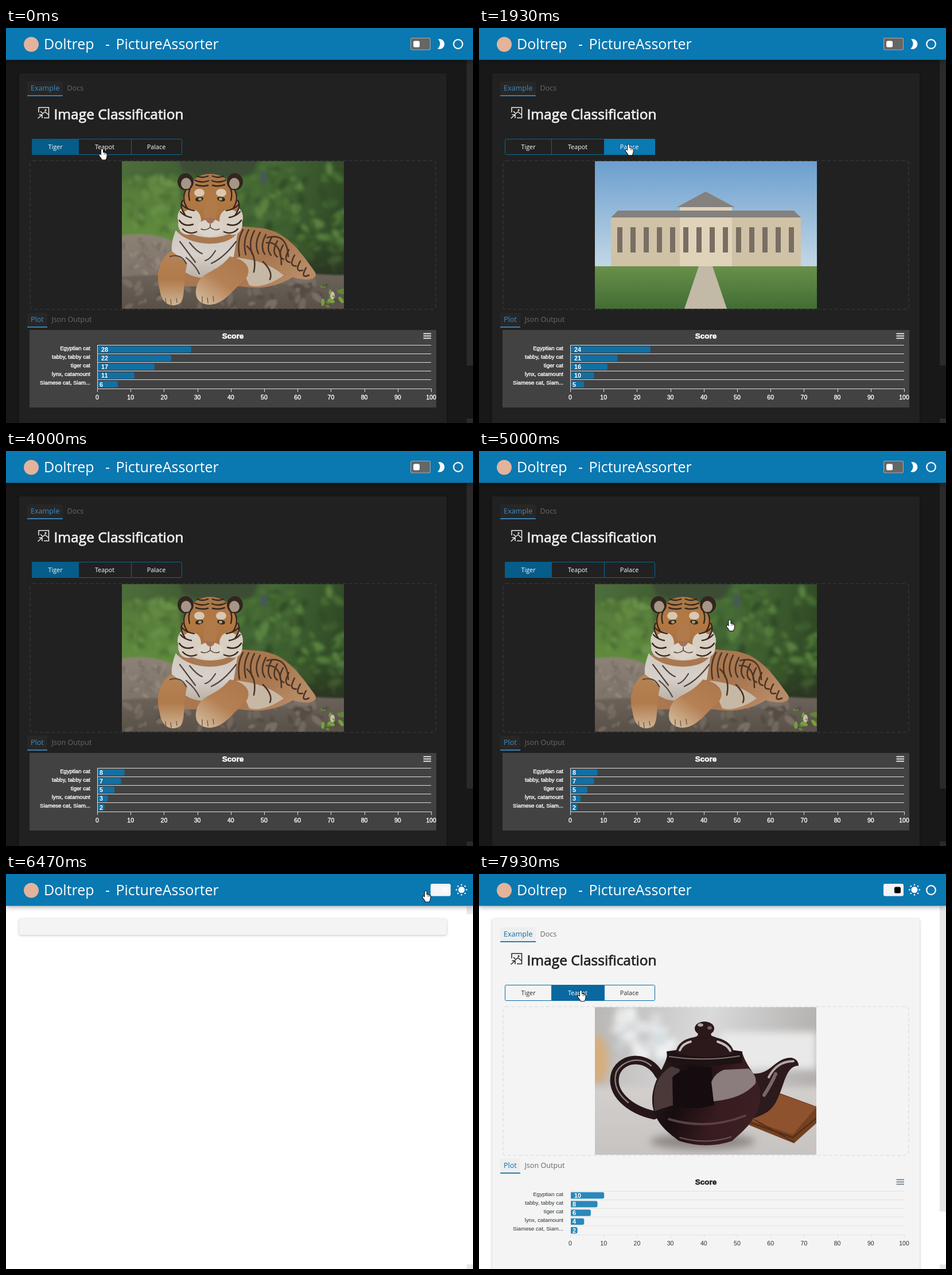
Animation, 814 px wide and 688 px high, one loop 8 s. Source, as an HTML page with a canvas:

```html
<!DOCTYPE html>
<html lang="en">
<head>
<meta charset="utf-8">
<title>Image Classification</title>
<style>
html, body { margin: 0; width: 100%; height: 100%; overflow: hidden; background: #181818; }
canvas { display: block; width: 814px; height: 688px; }
</style>
</head>
<body>
<canvas id="stage" width="814" height="688"></canvas>
<script>
const LOOP = 8000;
const SANS = '"Open Sans", sans-serif';
const ARIAL = '"Liberation Sans", Arial, sans-serif';
const stage = document.getElementById('stage').getContext('2d');
let g = stage;

const DARK = {
  bg: '#181818', card: '#212121', thumb: '#2a2a2a', tabBg: '#272727', accent: '#3c8cc4', muted: '#686868',
  head: '#eeeeee', btnText: '#ffffff', btnLine: '#0b6797', active: '#065d8a', hover: '#0b79b2',
  dash: '#343434', chart: '#424242', grid: '#dedede', label: '#ffffff', weight: 0.35, title: '#ffffff',
  bar: '#126fa3', menu: '#f0f0f0'
};
const LIGHT = {
  bg: '#ffffff', card: '#f4f4f4', thumb: '#e8e8e8', tabBg: '#eeeeee', accent: '#0a6fa6', muted: '#666666',
  head: '#242424', btnText: '#2b2b2b', btnLine: '#0a6ea5', active: '#0a78b1', hover: '#0a68a0',
  dash: '#e2e2e2', chart: '#f4f4f4', grid: '#e2e2e2', label: '#373d3f', weight: 0.05, title: '#222222',
  bar: '#2b88ba', menu: '#6e8192'
};

// Drawing helpers
function rect(color, x, y, w, h, r = 0) {
  g.fillStyle = color;
  g.beginPath();
  g.roundRect(x, y, w, h, r);
  g.fill();
}
function shape(color, d) {
  g.fillStyle = color;
  g.fill(new Path2D(d));
}
function line(color, width, d) {
  g.strokeStyle = color;
  g.lineWidth = width;
  g.stroke(new Path2D(d));
}
function oval(color, x, y, rx, ry = rx, rot = 0) {
  g.fillStyle = color;
  g.beginPath();
  g.ellipse(x, y, rx, ry, rot, 0, Math.PI * 2);
  g.fill();
}
function text(str, x, y, font, color, align = 'left', weight = 0) {
  g.font = font;
  g.fillStyle = color;
  g.textAlign = align;
  g.fillText(str, x, y);
  if (!weight) return;
  g.strokeStyle = color;
  g.lineWidth = weight;
  g.strokeText(str, x, y);
}
function fade(x0, y0, x1, y1, ...colors) {
  const grad = g.createLinearGradient(x0, y0, x1, y1);
  colors.forEach((c, i) => grad.addColorStop(i / (colors.length - 1), c));
  return grad;
}
function seeded(seed) {
  return () => (seed = (seed * 16807) % 2147483647) / 2147483647;
}
function scatter(seed, n, colors, x, y, w, h, size) {
  const rnd = seeded(seed);
  for (let i = 0; i < n; i++) {
    const c = colors[Math.floor(rnd() * colors.length)];
    const px = x + rnd() * w, py = y + rnd() * h, s = size * (0.5 + rnd());
    oval(c, px, py, s, s * 0.5, rnd() * 3);
  }
}
function soften(px) {
  g.filter = px ? `blur(${px}px)` : 'none';
}

// Pictures, painted once in stage coordinates
function photo(x, w, paint) {
  const cv = document.createElement('canvas');
  cv.width = w;
  cv.height = 257;
  const keep = g;
  g = cv.getContext('2d');
  g.translate(-x, -232);
  g.lineCap = 'round';
  paint();
  g = keep;
  return { cv, x };
}

function paintTigerHead() {
  oval('#d5cbc0', 356, 330, 57, 35);
  oval(fade(0, 254, 0, 345, '#a87749', '#b37943', '#a87042'), 356, 306, 49, 52);
  oval('#d8cec2', 320, 338, 19, 23, 0.5);
  oval('#d8cec2', 392, 338, 19, 23, -0.5);
  oval('#dcd3c9', 356, 348, 23, 15);
  oval('#b07a4a', 356, 318, 12, 20);
  [-1, 1].forEach(s => {
    g.save();
    g.translate(356, 0);
    g.scale(s, 1);
    oval('#31261f', 43, 268, 14, 15);
    oval('#a79586', 42, 271, 9, 10);
    oval('#dac7b1', 19, 287, 9, 7);
    line('#34271f', 2.4, 'M4 258Q14 262 23 258M3 266Q15 271 27 265M4 274Q14 277 25 273M33 275Q40 286 36 300M42 281Q51 297 40 314M48 300Q54 311 44 325M28 318Q42 316 49 308M33 330Q45 328 52 320M30 342Q46 347 54 335M24 355Q38 361 48 350');
    oval('#33281f', 19, 298, 7, 4, 0.2);
    oval('#a5a27c', 18, 298, 3, 2.4);
    g.restore();
  });
  shape('#a3705a', 'M347 331H365Q363 339 356 341Q349 339 347 331Z');
  line('#584439', 1.6, 'M356 342V347Q348 354 340 350M356 347Q364 354 372 350');
}

function paintTiger() {
  rect(fade(202, 232, 589, 300, '#4d6e3b', '#3f5c32', '#456936', '#304a26'), 202, 232, 387, 257);
  soften(3);
  shape(fade(0, 260, 0, 360, '#54783b', '#608c3d'), 'M195 262H305V380H195Z');
  scatter(7, 45, ['#638b43', '#4d7235', '#6b924a'], 202, 260, 100, 95, 9);
  scatter(23, 150, ['#3c5d2d', '#4f7838', '#5a8341', '#314c27', '#476c33'], 395, 240, 194, 180, 10);
  shape('#3c4c35', 'M300 225H445L425 258Q380 266 310 252Z');
  shape('#46565c', 'M446 244L456 256 452 275 443 264Z');
  rect(fade(0, 360, 0, 430, 'rgba(35,48,28,0)', 'rgba(43,49,34,.8)'), 500, 350, 95, 90);
  soften(1.5);
  shape(fade(0, 360, 0, 440, '#8c8175', '#7c7268'), 'M198 362C235 355 275 360 300 376V489H198Z');
  scatter(5, 28, ['#91867a', '#7b7168'], 204, 370, 90, 60, 6);
  shape(fade(0, 430, 0, 489, '#6b6259', '#595148'), 'M198 434C285 422 400 445 470 432C520 422 550 432 594 430V495H198Z');
  scatter(31, 60, ['#70675d', '#554d45', '#786e64'], 204, 441, 380, 45, 8);
  oval('#736a64', 482, 437, 18, 9);
  oval('#7c7169', 517, 437, 17, 8);

  soften(0.7);
  shape(fade(410, 350, 500, 440, '#a97850', '#a8764f', '#b78b65'), 'M300 368C290 330 390 344 440 348C487 352 510 385 538 424C548 440 518 441 500 434C470 452 440 455 410 450H300Z');
  shape('#c7b8a5', 'M402 400C438 404 462 412 484 431C466 444 440 454 424 448Z');
  for (let i = 0; i < 12; i++) {
    const x = 413 + i * 10, y = 351 + i * i * 0.55;
    line('#4a3527', 2.6, `M${x} ${y}Q${x - 11} ${y + 20} ${x - 6 + i} ${y + 46 - i * 3}`);
  }
  line('#4a3527', 2.6, 'M455 365Q490 356 492 398M454 374Q480 371 480 412M420 380Q438 396 432 425M448 407Q466 425 460 438');
  shape(fade(0, 350, 0, 440, '#cfc7be', '#d6d1cb', '#b7aca1'), 'M296 352C320 383 390 383 404 355L397 398C372 444 330 442 305 420C283 400 287 375 296 352Z');
  shape(fade(0, 390, 0, 486, '#b58356', '#b07a4a', '#d1b899'), 'M288 388C268 402 260 426 268 456C271 482 291 489 305 478C313 466 308 439 316 410Z');
  shape(fade(400, 400, 345, 480, '#ad784b', '#b58154', '#d1b899'), 'M390 398C421 403 430 422 417 438C397 453 383 480 356 482C331 482 326 462 335 443C344 424 370 424 390 398Z');
  line('#6b5a4a', 1.4, 'M278 471L279 480M287 473L288 482M297 471L298 478M342 468V478M351 470L352 479M361 467L362 476');
  line('#51423a', 2.2, 'M303 372Q318 392 330 408M401 372Q380 400 358 410M314 400Q330 413 337 428M286 398Q305 392 314 410M365 388Q355 404 347 405M320 374Q333 390 342 393');
  paintTigerHead();
  oval('#c7bfaa', 569, 466, 4, 7);
  scatter(3, 12, ['#759f3d', '#628635'], 550, 450, 38, 36, 5);
  soften(0);
}

function paintTeapot() {
  rect(fade(202, 232, 589, 310, '#b9b7b5', '#d9dadb', '#b3b0ae'), 202, 232, 387, 257);
  soften(7);
  oval('#d6ad7e', 205, 324, 21, 43);
  scatter(19, 28, ['#edf1f3', '#d4dde1', '#f5f6f6'], 245, 240, 85, 75, 12);
  rect('#e9e9e9', 420, 275, 169, 65);
  rect(fade(0, 360, 0, 489, '#d4d0cd', '#c6c3c1'), 190, 370, 410, 135);
  oval('#8f8886', 390, 466, 91, 14);
  soften(0);
  shape('#74401f', 'M503 374L588 405V434L549 469 470 437Z');
  shape('#8e522e', 'M505 377L588 406 547 454 476 430Z');
  line('#4f2b19', 2, 'M473 433L547 459 587 426M480 428L548 466');
  line('#251719', 15, 'M314 350C297 316 250 316 238 347C227 382 264 411 305 420');
  line('#8c7c7b', 2.5, 'M300 334C280 316 249 325 239 346C233 369 244 385 260 398');
  shape('#2c1a1d', 'M466 345C508 358 512 319 545 320Q557 323 557 334C535 334 533 365 521 390C511 415 494 420 474 427Z');
  line('#b5a8a7', 4, 'M505 354Q519 326 548 326');
  line('#776668', 6, 'M497 385Q510 365 517 348');
  const body = fade(300, 330, 493, 410, '#2c1d1e', '#160d0f', '#371b1f', '#3c2023');
  shape(body, 'M329 312H459C468 341 493 356 490 393C485 431 455 452 441 465Q397 480 349 465C329 450 300 430 302 389C305 354 324 339 329 312Z');
  shape('#4b393a', 'M309 365Q318 345 335 335L350 340Q342 376 343 401L306 413Q302 387 309 365Z');
  shape('#140c0e', 'M337 354Q355 335 405 337L410 402Q373 414 338 402Z');
  shape('#8b7c7d', 'M405 362Q412 346 427 341L470 339Q485 351 482 365Q460 391 409 396Z');
  line('#584146', 4, 'M331 427Q398 447 464 421');
  line('#675759', 2, 'M350 459Q397 472 439 458');
  shape('#1d1214', 'M327 309Q394 299 459 309L458 329Q395 338 329 328Z');
  shape('#2c191c', 'M343 311Q346 289 376 284Q395 276 414 285Q441 291 445 313Q394 326 343 311Z');
  line('#c9bfbd', 4, 'M416 292Q434 298 438 308M350 307Q355 295 369 292');
  line('#806f6d', 2, 'M332 318Q394 327 454 317');
  shape('#291719', 'M383 275H403L407 287Q394 294 379 287Z');
  oval('#2a181b', 393, 269, 17, 12);
  oval('#b0a4a2', 386, 263, 5, 3);
  oval('#746060', 402, 268, 4, 3);
}

function paintPalace() {
  rect(fade(0, 232, 0, 430, '#6c9fce', '#c9dce8'), 202, 232, 387, 257);
  rect('#d0c2a7', 230, 330, 331, 85);
  rect('#dfd3ba', 350, 312, 91, 103);
  shape('#84817e', 'M230 330L242 318H549L561 330ZM345 312L395 285 446 312Z');
  for (let i = 0; i < 14; i++) rect('#786e62', 241 + i * 23, 347, 9, 44);
  rect(fade(0, 415, 0, 489, '#68904a', '#426d34'), 202, 415, 387, 74);
  shape('#c3b9a7', 'M383 415H407L432 489H358Z');
}

function paintDog() {
  rect(fade(299, 232, 492, 489, '#94b6de', '#9bb8de', '#86a7cf'), 299, 232, 193, 257);
  soften(2);
  scatter(11, 45, ['#86a6cd', '#a1bde1', '#8eafd5'], 302, 350, 120, 130, 7);
  scatter(43, 45, ['#7a9fc3', '#8badd1', '#7298bd'], 390, 410, 75, 75, 8);
  soften(0);
  line('#665c5b', 7, 'M343 337Q333 326 326 307');
  shape('#756a66', 'M337 333Q357 326 379 343L411 361Q418 388 397 401L370 398 354 378 341 382Q329 355 337 333Z');
  oval('#706461', 347, 375, 7, 11);
  oval('#786b66', 378, 405, 10, 15);
  oval('#786b66', 399, 404, 8, 13);
  shape('#675b57', 'M377 341L412 337 419 350 418 384Q401 398 383 382Q371 362 377 341Z');
  const rnd = seeded(71);
  for (let i = 0; i < 190; i++) {
    const x = 337 + rnd() * 73, y = 335 + rnd() * 22 + (x - 337) * 0.52;
    line(['#877a73', '#5f5656', '#95877c'][i % 3], 1.2, `M${x} ${y}l${rnd() * 7 - 2} ${4 + rnd() * 5}`);
  }
  shape('#403b3e', 'M377 345L393 340 386 358ZM405 338L418 338 416 357Z');
  oval('#28282d', 409, 386, 6, 3);
  oval('#29272a', 401, 365, 2);
}

const photos = {
  tiger: photo(202, 387, paintTiger),
  teapot: photo(202, 386, paintTeapot),
  palace: photo(202, 387, paintPalace),
  dog: photo(299, 193, paintDog)
};

// Timeline
const shown = [[0, 'tiger'], [300, 'teapot'], [1450, 'palace'], [2600, 'tiger'], [5240, 'dog'], [6730, 'tiger'], [7700, 'teapot']];
const chosen = [[0, 0], [150, 1], [1290, 2], [2450, 0], [7600, 1]];
const scores = [
  [-1000, [28, 22, 17, 11, 6]], [620, [18, 14, 11, 7, 4]], [1760, [24, 21, 16, 10, 5]],
  [2640, [8, 7, 5, 3, 2]], [5235, [0, 0, 0, 0, 0]], [7100, [10, 8, 6, 4, 2]]
];
const busy = [[150, 600], [1290, 1740], [2450, 2640], [3000, 3300], [3600, 3900], [5250, 5480], [7070, 7250], [7600, 7750]];
const pointer = [
  [0, 162, 210], [700, 162, 210], [1050, 257, 202], [1900, 257, 202], [2400, 92, 206],
  [2780, 92, 206], [3300, 17, 240], [4450, 44, 330], [5200, 513, 286], [5600, 513, 286],
  [6000, 716, 25], [6200, 716, 25], [6400, 726, 29], [6950, 726, 29], [7420, 172, 202], [LOOP, 172, 202]
];
const labels = ['Egyptian cat', 'tabby, tabby cat', 'tiger cat', 'lynx, catamount', 'Siamese cat, Siam...'];

const indexAt = (keys, t) => keys.findLastIndex(k => k[0] <= t);
const at = (keys, t) => keys[indexAt(keys, t)][1];
const clamp = v => Math.max(0, Math.min(1, v));
const ease = p => p * p * (3 - 2 * p);

function pointerAt(t) {
  if (t > 3300 && t < 4450) return null;
  const i = Math.min(indexAt(pointer, t), pointer.length - 2);
  const [t0, x0, y0] = pointer[i], [t1, x1, y1] = pointer[i + 1];
  const p = ease((t - t0) / (t1 - t0));
  return [x0 + (x1 - x0) * p, y0 + (y1 - y0) * p];
}

function shadow(color, blur, y) {
  g.shadowColor = color;
  g.shadowBlur = blur;
  g.shadowOffsetY = y;
}

function drawHeader(t, light, blank) {
  g.save();
  shadow('rgba(0,0,0,.3)', 8, 2);
  rect('#0a78b1', 0, 0, 814, 55.5);
  g.restore();
  oval('#e3b39b', 44, 28.5, 13);
  const font = '25px ' + SANS;
  text('Doltrep', 66, 37, font, '#fff');
  text('-', 173, 37, font, '#fff');
  text('PictureAssorter', 191.5, 37, font, '#fff');
  const dx = blank ? 35 : 0;
  rect(light ? '#f3f5f6' : '#aaa', 705 + dx, 17, 35, 21.5, 3);
  if (!light) rect('#666', 706, 18, 33, 19.5, 2);
  rect(blank ? '#fafafa' : light ? '#000' : '#fff', (light ? 724 : 710) + dx, 22.5, 11, 11, 2.5);
  if (light) {
    const cx = 759 + dx;
    oval('#fff', cx, 27.5, 5.5);
    for (let i = 0; i < 8; i++) {
      const a = i * Math.PI / 4;
      oval('#fff', cx + 8.8 * Math.cos(a), 27.5 + 8.8 * Math.sin(a), 1.3);
    }
  } else {
    shape('#fff', 'M753 19.5A8.8 8.8 0 1 1 752 36A10.5 10.5 0 0 0 753 19.5Z');
  }
  if (blank) return;
  const spinning = busy.some(([a, b]) => t >= a && t < b);
  const start = spinning ? t / 1000 * Math.PI * 2 : 0;
  g.strokeStyle = '#fff';
  g.lineWidth = 2.2;
  g.beginPath();
  g.arc(788, 28, 7.8, start, start + Math.PI * (spinning ? 1 : 2));
  g.stroke();
}

function drawTabs(c, y, first, second, width) {
  rect(c.tabBg, 37, y - 16, width, 24, 3);
  rect(c.accent, 37, y + 8, width, 1.7);
  const font = '12.6px ' + SANS;
  text(first, 43, y, font, c.accent);
  text(second, 37 + width + 7.5, y, font, c.muted);
}

function drawButtons(c, t, cursor) {
  const edges = [45, 127, 218, 307];
  const on = at(chosen, t);
  const x = edges[on], w = edges[on + 1] - x;
  const over = cursor && cursor[0] + 5 > x && cursor[0] + 5 < x + w && cursor[1] > 193 && cursor[1] < 221;
  g.strokeStyle = c.btnLine;
  g.lineWidth = 1;
  g.beginPath();
  g.roundRect(45.5, 193.5, 261, 27, 2);
  g.stroke();
  line(c.btnLine, 1, 'M126.5 194V220M218.5 194V220');
  rect(over ? c.hover : c.active, x, 193, w, 28, 1);
  ['Tiger', 'Teapot', 'Palace'].forEach((name, i) =>
    text(name, [86, 172, 262][i], 211, '10.8px ' + SANS, i === on ? '#fff' : c.btnText, 'center'));
}

function drawChart(c, t) {
  const k = indexAt(scores, t);
  const [start, now] = scores[k], old = scores[Math.max(0, k - 1)][1];
  rect(c.chart, 41, 526, 709, 135);
  text('Score', 395.5, 541, 'bold 13.5px ' + ARIAL, c.title, 'center', 0.6);
  for (let i = 0; i < 3; i++) rect(c.menu, 727.5, 531.5 + i * 4, 13.5, 1.8);
  for (let i = 0; i < 6; i++) rect(c.grid, 159, Math.round(551.6 + i * 15.2), 582, 1);
  if (c === DARK) rect(c.grid, 159, 552, 1, 77);
  for (let i = 0; i < 11; i++) {
    const x = 159 + i * 58.2;
    rect(c.grid, Math.round(x), 628, 1, 6);
    text(String(i * 10), x, 647, '10.6px ' + ARIAL, c.label, 'center', c.weight);
  }
  labels.forEach((name, i) => {
    const y = 554.2 + i * 15.2;
    const p = ease(clamp((t - start - 80 - i * 110) / 100));
    const v = old[i] + (now[i] - old[i]) * p;
    rect(c.bar, 160, y, v * 5.82, 11.2, [0, 3, 3, 0]);
    text(now[i], now[i] > 9 ? 166 : 163, y + 9.5, 'bold 10.8px ' + ARIAL, '#fff');
    text(name, 147, 561 + i * 15, '9.6px ' + ARIAL, c.label, 'right', c.weight);
  });
}

function drawCursor([x, y]) {
  g.save();
  g.translate(x, y);
  const hand = 'M4 2Q5.5 -.5 7 2V7Q12 7 13.5 9.5V13Q13 17 11.5 19.3H5.5Q4 16 .5 12Q.5 9.5 2.3 10L4 12Z';
  line('#111', 2, hand);
  shape('#fff', hand);
  line('#222', 0.8, 'M9.2 8V10.5M11.3 8.5V10.8');
  g.restore();
}

function drawPage(c, t, cursor) {
  drawTabs(c, 109, 'Example', 'Docs', 62);
  line(c.head, 1.5, 'M57 147V138.5H74.5V156.5H66M60 145L64 149 68 146 74 151M55.5 157.5L63 151M57.5 151H63V157');
  oval(c.head, 69, 143, 1.6);
  text('Image Classification', 83.5, 159, '24.5px ' + SANS, c.head, 'left', 0.8);
  drawButtons(c, t, cursor);
  g.save();
  g.setLineDash([6, 4]);
  g.strokeStyle = c.dash;
  g.lineWidth = 1.6;
  g.beginPath();
  g.roundRect(42, 231, 707, 259, 5);
  g.stroke();
  g.restore();
  const pic = photos[at(shown, t)];
  g.drawImage(pic.cv, pic.x, 232);
  drawTabs(c, 512, 'Plot', 'Json Output', 35);
  if (c === DARK || t >= 7070) drawChart(c, t);
}

function draw(t) {
  const light = t >= 6200, blank = light && t < 6730;
  const c = light ? LIGHT : DARK;
  const cursor = pointerAt(t);
  rect(c.bg, 0, 0, 814, 688);
  g.save();
  shadow('rgba(0,0,0,.25)', 4, 1);
  rect(c.card, 23, light ? 78 : 79, 745, blank ? 28 : 640, 3);
  g.restore();
  rect(c.thumb, 803, 56, 11, blank ? 14 : 532);
  rect(c.thumb, 803, 680, 11, 8);
  drawHeader(t, light, blank);
  if (!blank) drawPage(c, t, cursor);
  if (cursor) drawCursor(cursor);
}

const begin = performance.now();
function tick() {
  draw((performance.now() - begin) % LOOP);
  requestAnimationFrame(tick);
}
tick();
</script>
</body>
</html>
```
